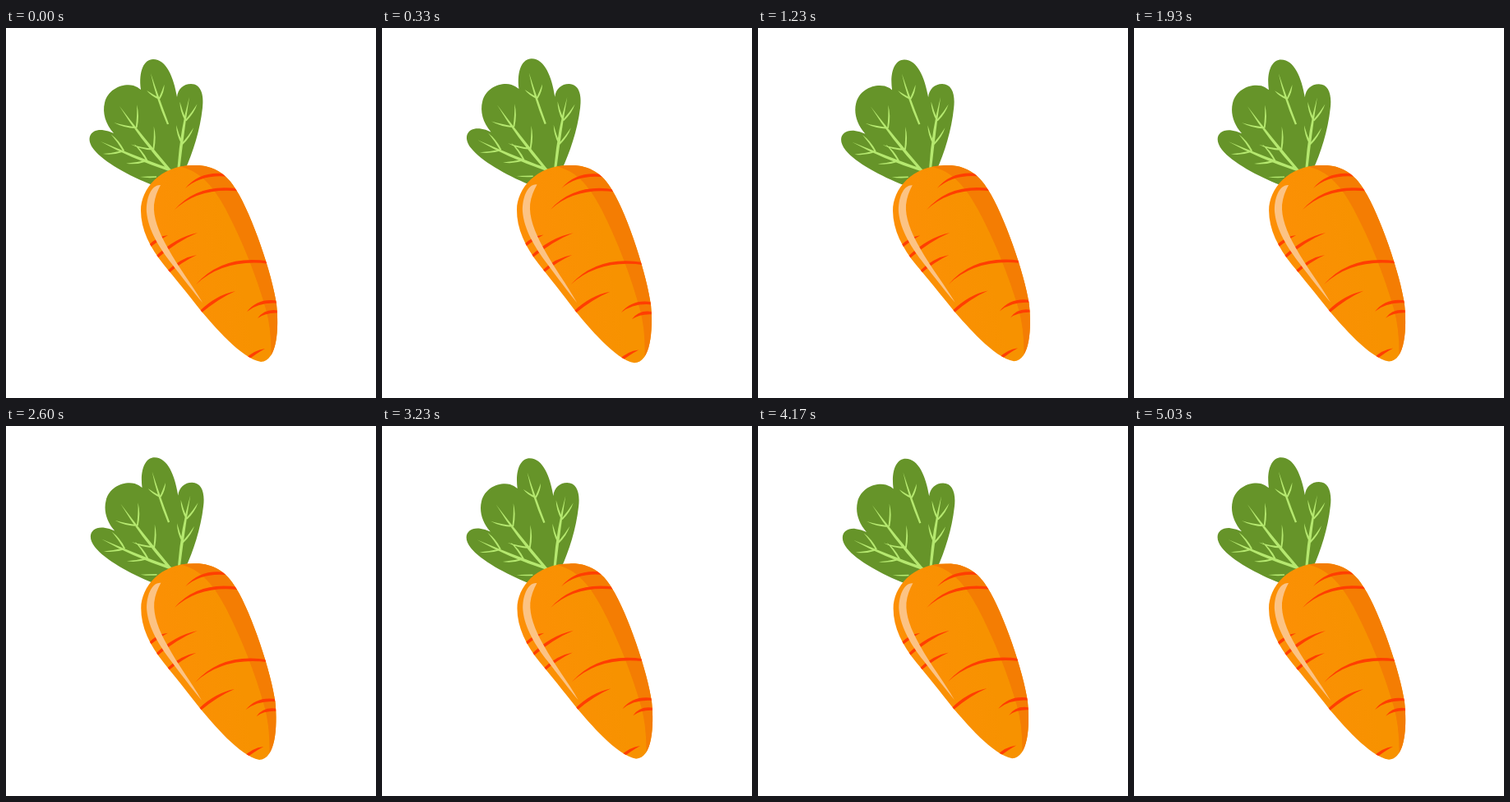
An HTML page that plays this animation: 450x450 px, repeating every 5060 ms.

```html
<!DOCTYPE html>
<html lang="en">
<head>
<meta charset="utf-8">
<title>Carrot</title>
<style>
html, body { margin: 0; width: 100%; height: 100%; overflow: hidden; background: #fff; }
svg { display: block; width: 100vw; height: 100vh; }
</style>
</head>
<body>
<svg viewBox="0 0 450 450">
  <defs>
    <path id="body" d="M164 222C164 196 187 167 228 167C250 166 268 176 280 197C299 227 324 300 329 336C332 366 330 405 310 406C286 402 252 361 238 345C220 322 206 305 192 288C175 267 164 245 164 222Z"/>
    <clipPath id="skin"><use href="#body"/></clipPath>
    <linearGradient id="flesh" x1="0" y1=".4" x2=".6" y2=".2">
      <stop stop-color="#fd8f06"/><stop offset="1" stop-color="#f79200"/>
    </linearGradient>
  </defs>
  <g id="carrot">
    <path fill="#669429" d="M178 191C150 180 119 163 107 148C96 134 103 123 117 124Q125 125 131 128C121 117 117 103 120 91C124 74 142 67 155 70Q161 72 164 75C161 52 168 38 179 38C195 38 204 60 208 84C209 74 216 68 225 68C237 68 241 81 239 97C236 125 227 152 218 172Q200 182 178 191Z"/>
    <path id="veins" fill="#b5e86f"/>
    <use href="#body" fill="url(#flesh)"/>
    <g clip-path="url(#skin)">
      <path fill="#f47d03" d="M208 168C238 172 255 198 267 220C287 258 304 300 316 342Q324 370 322 410L345 410V160Z"/>
      <path id="stripes" fill="#ff3e02"/>
    </g>
    <path fill="#fcc384" d="M188 191C177 190 170 207 171 224C173 246 187 268 201 286C214 303 228 321 239 334C227 313 209 290 197 268C185 247 179 230 180 215C181 206 184 198 188 191Z"/>
  </g>
</svg>
<script>
const LOOP = 5060, CX = 225, CY = 222, RAD = Math.PI / 180;
const $ = id => document.getElementById(id);

// Bowed mark running from a sharp tip to a root of width w
function taper(x, y, angle, len, w, bow) {
  const ux = Math.cos(angle), uy = Math.sin(angle);
  const at = (along, side) => `${x + ux * along - uy * side} ${y + uy * along + ux * side}`;
  const mid = len * .45, bend = len * bow;
  return `M${x} ${y}Q${at(mid, bend - w * .8)} ${at(len, -w / 2)}` +
         `L${at(len, w / 2)}Q${at(mid, bend + w * .8)} ${x} ${y}Z`;
}

// Stem from root to tip with evenly spaced pairs of side veins
function sprig(rx, ry, tx, ty, pairs, spread) {
  const len = Math.hypot(rx - tx, ry - ty), angle = Math.atan2(ry - ty, rx - tx);
  let d = taper(tx, ty, angle, len, 1.5 + pairs * .8, .03);
  for (let i = 1; i <= pairs; i++) {
    const k = i / (pairs + 1);
    const jx = rx + (tx - rx) * k, jy = ry + (ty - ry) * k;
    for (const side of [-1, 1]) {
      const a = angle + side * spread * RAD, reach = len * .28;
      d += taper(jx - Math.cos(a) * reach, jy - Math.sin(a) * reach, a, reach, 1.8, -side * .08);
    }
  }
  return d;
}

$('veins').setAttribute('d',
  sprig(200, 174, 138, 95, 2, 39) +
  sprig(197, 117, 176, 55, 1, 38) +
  sprig(210, 170, 223, 84, 2, 26) +
  sprig(200, 173, 115, 138, 2, 30) +
  sprig(198, 171, 171, 161, 0) +
  sprig(183, 181, 163, 181, 0));

// Tip and length of each stripe; the skin clips the thick end
const rightward = [[218, 195, 54], [205, 221, 82], [231, 312, 92], [293, 345, 40], [306, 353, 27]];
const leftward = [[197, 252, 27], [233, 249, 59], [232, 276, 42], [279, 320, 50], [315, 390, 28]];
$('stripes').setAttribute('d',
  rightward.map(([x, y, len]) => taper(x, y, -17 * RAD, len, 3.2, -.25)).join('') +
  leftward.map(([x, y, len]) => taper(x, y, 149 * RAD, len, 3.2, .11)).join(''));

// Damped wobble, u in seconds since it began
const wobble = u => u < 0 ? 0 : 2.6 * Math.exp(-1.6 * u) * Math.sin(2 * Math.PI * u / .64);

function frame() {
  const t = performance.now() % LOOP;
  const turn = wobble((t - 70) / 1000) + wobble((t - 2580) / 1000);
  const size = 1 - .01 * Math.sin(Math.PI * (t / LOOP) ** 3);
  $('carrot').setAttribute('transform',
    `translate(${CX} ${CY}) rotate(${turn}) scale(${size}) translate(${-CX} ${-CY})`);
  requestAnimationFrame(frame);
}
frame();
</script>
</body>
</html>
```
